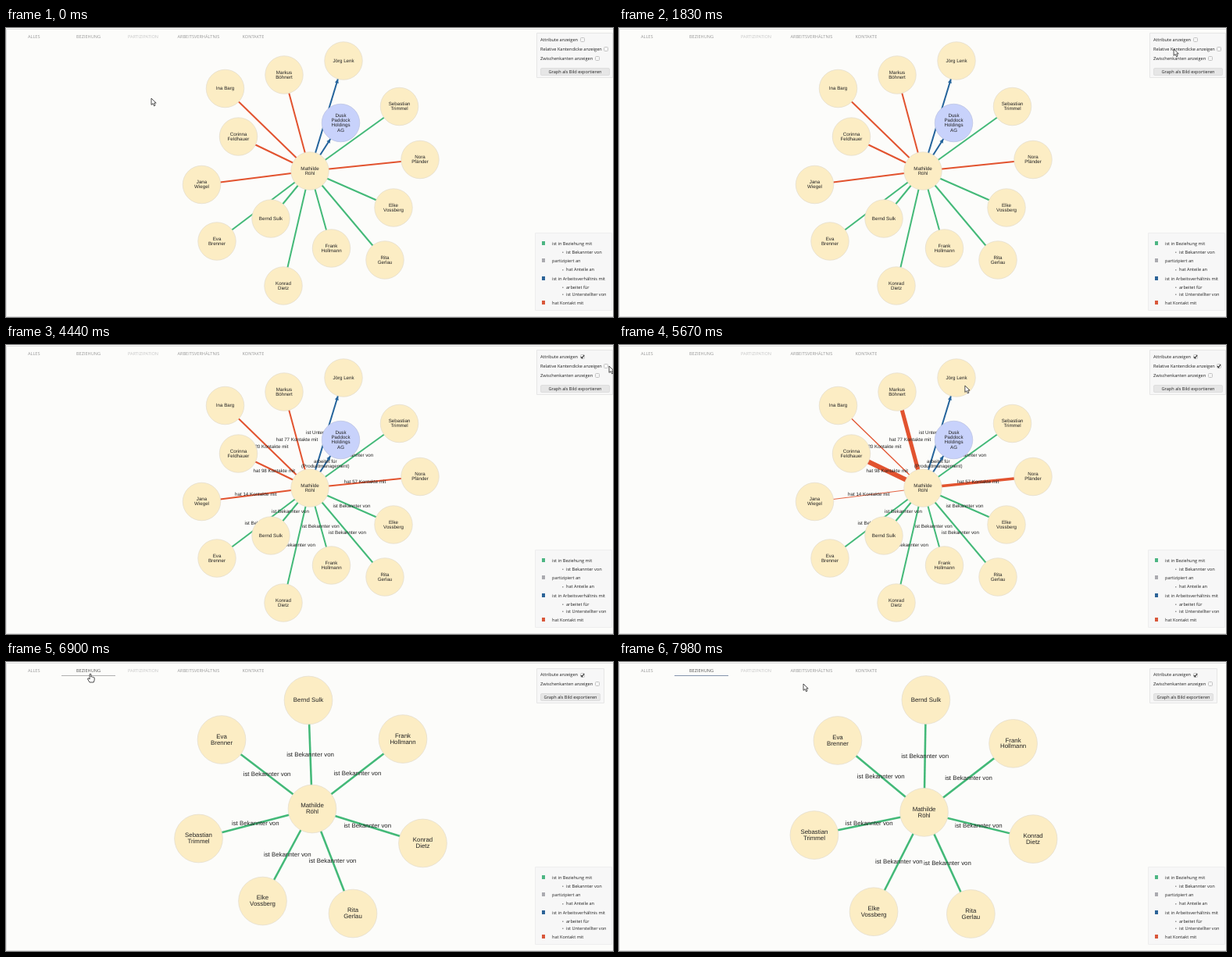
An HTML page with a canvas that plays this animation: 777 by 370 pixels, repeating every 8000 ms.

```html
<!DOCTYPE html>
<html lang="de">
<head>
<meta charset="utf-8">
<title>Beziehungsgraph</title>
<style>
  html, body { margin: 0; height: 100%; overflow: hidden; background: #fcfcfa; }
  canvas { display: block; }
</style>
</head>
<body>
<canvas id="stage" width="777" height="370"></canvas>
<script>
const ctx = document.getElementById('stage').getContext('2d');
const LOOP = 8000;
const UI_FONT = '5.6px "Open Sans", "Noto Sans", sans-serif';
const RED = '#e2532f', GREEN = '#43b978', BLUE = '#23639b';

// Moments at which the page changes abruptly
const ATTRIBUTES_ON = 2980, THICKNESS_ON = 4680, TAB_HOVER = 6300;
const TAB_CLICK = 6750, GRAPH_SHOWN = 6830, SETTLE_START = 6900;

const hub = { name: 'Mathilde\nRöhl', x: 389, y: 183, from: [392, 188], to: [390.5, 192.5] };
const friend = (name, x, y, from, to) =>
  ({ name, x, y, from, to, color: GREEN, label: 'ist Bekannter von' });
const contact = (name, x, y, count) =>
  ({ name, x, y, count, color: RED, label: `hat ${count} Kontakte mit` });
const work = (name, x, y, label, fill) =>
  ({ name, x, y, label, fill, color: BLUE, arrow: true });

const nodes = [
  work('Jörg Lenk', 432, 42, 'ist Unterstellter von'),
  contact('Markus\nBöhnert', 356, 60, 77),
  contact('Ina Barg', 280.5, 77.5, 20),
  contact('Corinna\nFeldhauer', 297.5, 139, 98),
  contact('Jana\nWiegel', 250.5, 200.5, 14),
  friend('Eva\nBrenner', 270, 273, [276, 99.5], [280, 100.5]),
  friend('Bernd Sulk', 339, 244, [387, 49], [393, 48.5]),
  friend('Konrad\nDietz', 355, 330, [533.5, 232], [530, 226.5]),
  friend('Frank\nHollmann', 416.5, 282, [508, 98.5], [504.5, 104.5]),
  friend('Rita\nGerlau', 485, 297, [444, 322], [450.5, 322.5]),
  friend('Elke\nVossberg', 496, 230, [328.5, 306], [326, 320]),
  contact('Nora\nPfänder', 530, 168.5, 57),
  friend('Sebastian\nTrimmel', 503.5, 100.5, [246.5, 226], [250, 221.5]),
  work('Dusk\nPaddock\nHoldings\nAG', 428.5, 121.5, 'arbeitet für\n(Produktmanagement)', '#c8d2fb'),
];

// Pointer path: time, x, y
const pointerPath = [
  [0, 186, 90], [910, 186, 90], [1670, 658, 37], [1750, 660, 36], [1830, 710, 27],
  [2050, 735, 14], [3500, 735, 14], [3900, 772, 27], [5330, 772, 27],
  [5670, 444, 52], [5900, 185, 69], [6300, 108, 15], [7590, 108, 15], [7960, 236, 28], [LOOP, 236, 28],
];

const mix = (a, b, k) => a + (b - a) * k;

function pointerAt(t) {
  const i = pointerPath.findIndex(p => p[0] > t);
  const [t0, x0, y0] = pointerPath[i - 1], [t1, x1, y1] = pointerPath[i];
  const k = (t - t0) / (t1 - t0);
  return [mix(x0, x1, k), mix(y0, y1, k)];
}

function text(str, x, y, color, align, font) {
  ctx.font = font;
  ctx.fillStyle = color;
  ctx.textAlign = align;
  ctx.fillText(str, x, y);
}

const uiText = (str, x, y, color = '#222', align = 'left') =>
  text(str, x, y + .5, color, align, UI_FONT);

function centeredLines(str, x, y, scale) {
  const lines = str.split('\n'), gap = 6.2 * scale;
  const font = `${6.2 * scale}px "Liberation Sans", Arial, sans-serif`;
  lines.forEach((line, i) =>
    text(line, x, y + (i - (lines.length - 1) / 2) * gap, '#222', 'center', font));
}

function box(x, y, w, h, fill, stroke, radius = 0) {
  ctx.beginPath();
  ctx.roundRect(x + .5, y + .5, w - 1, h - 1, radius);
  ctx.fillStyle = fill;
  ctx.fill();
  ctx.strokeStyle = stroke;
  ctx.lineWidth = 1;
  ctx.stroke();
}

function line(points, color, width) {
  ctx.beginPath();
  points.forEach(([x, y]) => ctx.lineTo(x, y));
  ctx.strokeStyle = color;
  ctx.lineWidth = width;
  ctx.stroke();
}

function arrowHead(a, b, radius) {
  ctx.save();
  ctx.translate(b.x, b.y);
  ctx.rotate(Math.atan2(b.y - a.y, b.x - a.x));
  ctx.beginPath();
  ctx.moveTo(-radius, 0);
  ctx.lineTo(-radius - 5, -2.5);
  ctx.lineTo(-radius - 5, 2.5);
  ctx.fillStyle = BLUE;
  ctx.fill();
  ctx.restore();
}

function drawGraph(center, outer, scale, showLabels, weighted) {
  const radius = 24.5 * scale;
  for (const n of outer) {
    const width = weighted && n.count ? n.count * .065 : 2 * scale;
    line([[center.x, center.y], [n.x, n.y]], n.color, width);
    if (n.arrow) arrowHead(center, n, radius);
  }
  if (showLabels) {
    for (const n of outer) centeredLines(n.label, (center.x + n.x) / 2, (center.y + n.y) / 2, scale);
  }
  for (const n of [...outer, center]) {
    ctx.beginPath();
    ctx.arc(n.x, n.y, radius - .25, 0, 2 * Math.PI);
    ctx.fillStyle = n.fill || '#fcedc4';
    ctx.fill();
    ctx.strokeStyle = n.fill ? '#b9c1e0' : '#e3dccc';
    ctx.lineWidth = .7;
    ctx.stroke();
    centeredLines(n.name, n.x, n.y, scale);
  }
}

function drawTabs(t, hovering) {
  const active = t >= TAB_HOVER;
  uiText('ALLES', 28, 11, '#999');
  uiText('BEZIEHUNG', 90, 11, active ? '#555' : '#999');
  uiText('PARTIZIPATION', 156, 11, '#c6c6c6');
  uiText('ARBEITSVERHÄLTNIS', 219.5, 11, '#999');
  uiText('KONTAKTE', 302.5, 11, '#999');
  if (active) line([[71, 17.5], [140, 17.5]], hovering ? '#b0b0b0' : '#8494ac', 1);
}

function option(label, x, y, checked) {
  uiText(label, 684, y);
  const top = Math.round(y - 3);
  box(x - 3, top, 6, 6, '#f6f6f6', '#c4c4c4', 1);
  if (checked) line([[x - 2, top + 3], [x - .6, top + 4.8], [x + 2, top + 1]], '#222', 1.1);
}

function drawOptions(t) {
  const filtered = t >= TAB_CLICK;
  const right = filtered ? 766 : 777, top = filtered ? 8 : 6, bottom = filtered ? 53 : 64;
  box(679, top, right - 679, bottom - top, '#f7f7f7', '#e6e6e6');
  let y = filtered ? 16.5 : 15;
  option('Attribute anzeigen', 738, y, t >= ATTRIBUTES_ON);
  if (!filtered) option('Relative Kantendicke anzeigen', 768, y += 12, t >= THICKNESS_ON);
  option('Zwischenkanten anzeigen', 757, y += 11.8, false);
  const width = filtered ? 77 : 89;
  box(684, Math.round(y + 11.7), width, 10, '#e6e6e6', '#dedede', 1.5);
  uiText('Graph als Bild exportieren', 684 + width / 2, y + 17, '#222', 'center');
}

function drawLegend() {
  box(677, 262, 99, 100, '#f7f7f7', '#eeeeee');
  const groups = [
    [276, '#4cb582', 'ist in Beziehung mit'],
    [298, '#aaaaaf', 'partizipiert an'],
    [321, '#2b6397', 'ist in Arbeitsverhältnis mit'],
    [352, '#d9573a', 'hat Kontakt mit'],
  ];
  const details = [
    [287, 'ist Bekannter von'], [309.5, 'hat Anteile an'],
    [332, 'arbeitet für'], [341, 'ist Unterstellter von'],
  ];
  for (const [y, color, label] of groups) {
    ctx.fillStyle = color;
    ctx.fillRect(686, y - 3, 4, 5);
    uiText(label, 699, y);
  }
  for (const [y, label] of details) {
    ctx.fillStyle = '#999';
    ctx.fillRect(712, y - .5, 1.5, 1.5);
    uiText(label, 717, y);
  }
}

const arrowShape = new Path2D('M0 0V8.4L2 6.6 3.5 9.8 5 9.1 3.6 6H6.2Z');
const handShape = new Path2D(
  'M-.9 .6Q0-.6 .9 .6V4Q2 3.2 2.6 4.3 3.6 3.7 4 4.8 5.2 4.4 5.2 5.8V8L4.2 11H-1L-3.4 7Q-3.6 5.6-2.2 5.8L-.9 7Z');

function drawPointer([x, y], hand) {
  ctx.save();
  ctx.translate(x, y);
  ctx.fillStyle = '#fff';
  ctx.strokeStyle = '#222';
  ctx.lineWidth = .8;
  const shape = hand ? handShape : arrowShape;
  ctx.fill(shape);
  ctx.stroke(shape);
  ctx.restore();
}

function draw(t) {
  const pointer = pointerAt(t);
  const hovering = t >= TAB_HOVER && pointer[0] < 140;

  ctx.fillStyle = '#fcfcfa';
  ctx.fillRect(0, 0, 777, 370);
  line([[777, 1.5], [.5, 1.5], [.5, 369.5], [777, 369.5]], '#dedede', 1);

  if (t < TAB_CLICK) {
    drawGraph(hub, nodes, 1, t >= ATTRIBUTES_ON, t >= THICKNESS_ON);
  } else if (t >= GRAPH_SHOWN) {
    const k = 1 - Math.exp(-Math.max(0, t - SETTLE_START) / 280);
    const settle = n => ({ ...n, x: mix(n.from[0], n.to[0], k), y: mix(n.from[1], n.to[1], k) });
    drawGraph(settle(hub), nodes.filter(n => n.from).map(settle), 1.27, true, false);
  }

  drawTabs(t, hovering);
  drawOptions(t);
  drawLegend();
  drawPointer(pointer, hovering);
}

ctx.textBaseline = 'middle';
ctx.textRendering = 'geometricPrecision';
ctx.lineJoin = 'round';

function tick() {
  draw(performance.now() % LOOP);
  requestAnimationFrame(tick);
}
tick();
</script>
</body>
</html>
```
